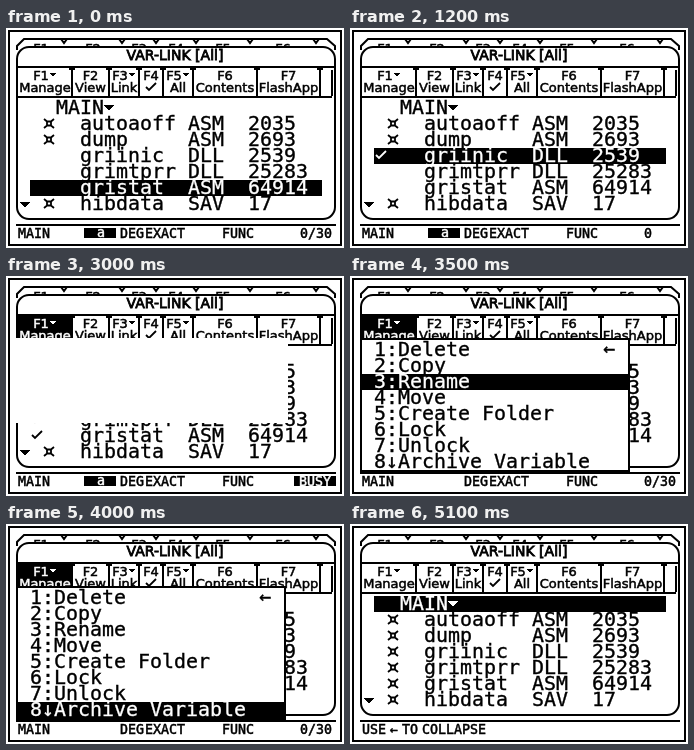
These frames come from a looping animation (338x220 px, 6.3 s). An HTML page:

```html
<!DOCTYPE html>
<html lang="en">
<head>
<meta charset="utf-8">
<title>VAR-LINK</title>
<style>
  html, body { margin: 0; width: 100%; height: 100%; overflow: hidden; background: #fff; }
  svg { display: block; width: 100%; height: 100%; }
  text { font: 19.93px "DejaVu Sans Mono", monospace; fill: #000; stroke: #000; stroke-width: .35px; white-space: pre; }
  .label { font: 13px "DejaVu Sans", sans-serif; text-anchor: middle; stroke-width: .5px; }
  .title { font-size: 14px; stroke-width: .8px; }
  .status { font: 13.3px "DejaVu Sans Mono", monospace; stroke-width: .5px; }
  .help { word-spacing: -4px; }
  .line { fill: none; stroke: #000; stroke-width: 2; }
  .icon { fill: none; stroke: #000; stroke-width: 1.8; }
  .bar { visibility: hidden; }
  .on > .bar { visibility: visible; }
  .on > text, .white { fill: #fff; stroke: #fff; }
  .on > .tri { fill: #fff; }
  .on > .icon { stroke: #fff; }
  .off { display: none; }
  rect, .crisp, .tri { shape-rendering: crispEdges; }
  .window { fill: #fff; shape-rendering: auto; }
</style>
</head>
<body>
<svg id="stage" viewBox="0 0 338 220"></svg>
<script>
const LOOP = 6300;
const files = [
  ["autoaoff", "ASM", 2035], ["dump", "ASM", 2693], ["griinic", "DLL", 2539],
  ["grimtprr", "DLL", 25283], ["gristat", "ASM", 64914], ["hibdata", "SAV", 17]
];
const menuItems = ["1:Delete", "2:Copy", "3:Rename", "4:Move", "5:Create Folder",
  "6:Lock", "7:Unlock", "8↓Archive Variable"];
// left edge, right edge, key, label, has arrow
const tools = [
  [12, 66, "F1", "Manage", 1], [66, 103, "F2", "View"], [103, 133, "F3", "Link", 1],
  [133, 157, "F4", ""], [157, 187, "F5", "All", 1], [187, 251, "F6", "Contents"],
  [251, 314, "F7", "FlashApp"]
];

const text = (x, y, s, cls = "") => `<text x="${x}" y="${y}" class="${cls}">${s}</text>`;
const box = (x, y, w, h, fill = "#000", cls = "") =>
  `<rect x="${x}" y="${y}" width="${w}" height="${h}" fill="${fill}" class="${cls}"/>`;
const line = d => `<path class="line crisp" d="${d}"/>`;
const tri = (x, y, w = 10) => `<path class="tri" d="M${x} ${y}h${w}l${-w / 2} ${w / 2 + 1}z"/>`;
const check = (x, y) => `<path class="icon check" d="M${x} ${y + 5}l3 3 7-7"/>`;
const star = y => `<path class="icon star" d="M38 ${y + 3}l3 2.5M48 ${y + 3}l-3 2.5M38 ${y + 12}l3-2.5` +
  `M48 ${y + 12}l-3-2.5M41 ${y + 5.5}h4v4h-4z"/>`;
const group = (id, body, cls = "") => `<g id="${id}" class="${cls}">${body}</g>`;

function tool([x, end, key, label, arrow], i) {
  const mid = (x + end) / 2, keyX = mid - (arrow ? 4 : 0);
  return group("tool" + i,
    box(x, 40, end - x, 28, "#000", "bar") +
    text(keyX, 52, key, "label") +
    (arrow ? tri(keyX + 9, 45, 6) : "") +
    (label ? text(mid, 64, label, "label") : check(mid - 5, 54))) +
    line(`M${end} 42V68M${end - 3} 41h6`);
}

function fileRow([name, type, size], i) {
  const y = 88 + 16 * i;
  return group("row" + (i + 1),
    box(24, y, 292, 16, "#000", "bar") + check(26, y + 2) + star(y) +
    text(74, y + 14, name) + text(182, y + 14, type) + text(242, y + 14, size));
}

function menuRow(s, i) {
  const y = 66 + 16 * i;
  return group("item" + i, box(12, y, 266, 16, "#000", "bar") + text(24, y + 14, s) +
    (i ? "" : text(253, y + 13, "←")));
}

// toolbar of the screen behind, only its top edge peeks out
const homeEdges = [12, 58, 116, 150, 190, 244, 310];
const homeTabs = homeEdges.slice(1).map(x => `M${x - 3} 11l3 4 3-4`).join("");
const homeKeys = homeEdges.slice(1).map((x, i) =>
  text((x + homeEdges[i]) / 2, 25, "F" + (i + 1), "label")).join("");

stage.innerHTML =
  box(2, 2, 334, 216) + box(4, 4, 330, 212, "#fff") +
  `<path class="line" d="M11 22V18l7-7H321l8 7v4${homeTabs}"/>` + homeKeys +
  `<rect class="line window" x="11" y="19" width="318" height="172" rx="12"/>` +
  text(169, 31.5, "VAR-LINK [All]", "label title") +
  line("M11 39H329M11 69H326M326 42V68") +
  tools.map(tool).join("") +
  group("list",
    group("row0", box(24, 72, 292, 16, "#000", "bar") + text(50, 86, "MAIN") + tri(98, 77)) +
    files.map(fileRow).join("") +
    group("more", tri(14, 174))) +
  group("wipe", box(10, 62, 272, 85, "#fff")) +
  group("menu",
    box(10, 62, 270, 134) + box(12, 64, 266, 130, "#fff") + menuItems.map(menuRow).join("")) +
  line("M10 197H330") +
  group("info",
    text(12, 210, "MAIN", "status") +
    group("alpha", box(78, 200, 32, 10) + text(91, 209, "a", "status white")) +
    text(114, 210, "DEG", "status") + text(139, 210, "EXACT", "status") +
    text(216, 210, "FUNC", "status") +
    `<text id="count" class="status" x="294" y="210"></text>` +
    group("busy", box(288, 200, 42, 10) + text(293, 210, "BUSY", "status white"))) +
  group("help", text(12, 210, "USE ← TO COLLAPSE", "status help"));

const $ = id => document.getElementById(id);
const show = (el, yes) => el.classList.toggle("off", !yes);
const mark = (id, yes) => $(id).classList.toggle("on", yes);

const base = { row: 5, checks: 0, item: -1, count: "0/30", alpha: true, more: true, list: true };
const steps = [];
let last = base;
// each step changes only what it names
const at = (t, change) => steps.push([t, last = { ...last, ...change }]);
at(0, {});
at(100, { row: -1, more: false, busy: true });
at(200, { row: 4, more: true, busy: false });
at(400, { row: 3 });
at(1200, { checks: 1, count: "0" });
at(1300, { count: "0/30" });
at(1500, { row: 4 });
at(1700, { checks: 2 });
at(1900, { row: 5 });
at(2100, { row: -1, checks: 3, more: false, busy: true });
at(2200, { row: 5, more: true, busy: false });
at(3000, { row: -1, f1: true, wipe: true, busy: true });
at(3100, { wipe: false, busy: false, alpha: false, item: 0, count: "0" });
for (let i = 1; i < 8; i++) at(3300 + 100 * i, { item: i, count: "0/30" });
at(4600, { item: -1, busy: true });
at(4700, { f1: false });
at(5000, { list: false });
at(5100, { list: true, row: 0, checks: 0, archived: true, help: true });

function draw(s) {
  mark("tool0", !!s.f1);
  for (let i = 0; i <= files.length; i++) {
    mark("row" + i, i === s.row);
    if (!i) continue;
    show($("row" + i).querySelector(".check"), i >= 3 && i - 3 < s.checks);
    show($("row" + i).querySelector(".star"), s.archived || i < 3 || i === 6);
  }
  menuItems.forEach((_, i) => mark("item" + i, i === s.item));
  for (const id of ["list", "more", "wipe", "alpha", "busy", "help"]) show($(id), s[id]);
  show($("menu"), s.item >= 0);
  show($("info"), !s.help);
  $("count").textContent = s.busy ? "" : s.count;
}

let shown;
function tick(now) {
  const t = now % LOOP;
  const state = steps.filter(s => s[0] <= t).pop()[1];
  if (state !== shown) draw(shown = state);
  requestAnimationFrame(tick);
}
tick(performance.now());
</script>
</body>
</html>
```
